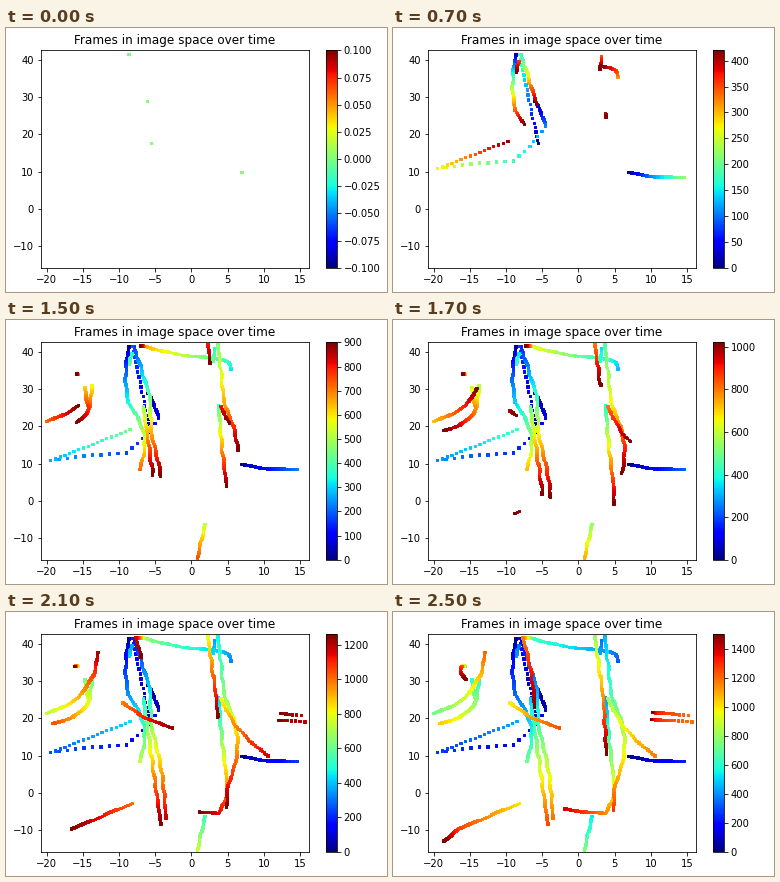
Animation, 381 px wide and 264 px high, one loop 2600 ms. Source, as a matplotlib script:

```python
import matplotlib.pyplot as plt
import numpy as np
from matplotlib.animation import FuncAnimation

WIDTH, HEIGHT, DPI = 381, 264, 72
FRAMES, INTERVAL = 26, 100
TIME_PER_FRAME = 60
SAMPLE = 10
WANDER = 0.1

rng = np.random.default_rng(4)


def leg(start, end, bend=0, ease=1):
    """Sample a bowed path between two (time, x, y) keys.

    bend is the sideways bow at the middle, positive to the left of the heading.
    ease above 1 starts slowly, below 1 ends slowly.
    """
    start, end = np.array(start, float), np.array(end, float)
    times = np.arange(start[0], end[0] + 1, SAMPLE)
    u = (times - start[0]) / (end[0] - start[0])
    u = u ** ease if ease >= 1 else 1 - (1 - u) ** (1 / ease)
    dx, dy = end[1:] - start[1:]
    length = np.hypot(dx, dy)
    waves = length / 5 * u + rng.random()
    side = np.sin(np.pi * u) * (bend + WANDER * np.sin(2 * np.pi * waves))
    x = start[1] + dx * u - dy / length * side
    y = start[2] + dy * u + dx / length * side
    return np.column_stack([times, x, y])


def route(start, *stops):
    """Chain legs; each stop is (time, x, y[, bend[, ease]])."""
    legs = []
    for stop in stops:
        legs.append(leg(start, stop[:3], *stop[3:]))
        start = stop[:3]
    return np.vstack(legs)


# Upper left
descent = route((0, -8.7, 41.5), (340, -8.8, 26.5, -0.4, 1.4), (720, -7.2, 8.6, 1.4))
excursion = route((0, -6.1, 29), (105, -4.6, 22.3, 0.2), (175, -9, 13, 0.3),
                  (265, -19.5, 10.9, -0.3), (440, -8.2, 19.5))
climb = route((0, -5.6, 17.6), (190, -8.2, 41.5, 0, 1.1))
long_fall = route((160, -8, 41.5), (420, -5.8, 28.2), (660, -5.6, 18),
                  (1180, -3.6, -6.6, 0.4))
side_fall = route((480, -6.7, 25.5), (1250, -4.3, -8.2))
short_fall = route((360, -8.3, 39.5), (420, -8.6, 36.8))
late_fall = route((1170, -7.7, 41.7), (1500, -6.1, 23, 0.3))
slope = route((980, -9.5, 24.3), (1240, -2.7, 17.5, -0.6))

# Far left
outer_rise = route((720, -20, 21.5), (900, -15.7, 25.8, -0.4), (1210, -13, 37.8, -0.7))
outer_fall = route((570, -13.8, 31), (740, -14.1, 25.5), (1040, -19.2, 18.7, 1.2))
outer_branch = route((620, -14.8, 30.4), (780, -14.3, 25))
hover = route((640, -15.7, 34.1), (1260, -16.2, 34), (1500, -15.6, 30.6, -0.4))
low_left = route((1000, -8.2, -2.7), (1260, -16.6, -9.6), (1500, -18.7, -13))

# Right half
drift = route((0, 6.9, 9.9), (225, 14.7, 8.6, -0.5, 1.2))
ceiling = route((315, 5.4, 35.5), (420, 3, 38.5, -0.8), (650, -6.5, 41.6, 0.6),
                (1150, -7.7, 41.7))
drop = route((350, 3.1, 41), (420, 2.9, 37.7))
inner_fall = route((400, 3.7, 25.7), (900, 4.8, 4, -0.1), (1140, 3.7, -5.4, 0.5),
                   (1400, -2, -4.2, 0.2))
bow = route((460, 3.6, 42), (660, 4.5, 26), (1140, 4.9, 1.5, 1.6), (1280, 4.8, -4.6))
branch = route((800, 4, 25.5), (1170, 10.5, 10, -0.9))
plumb = route((800, 2.2, 42), (1140, 3.4, 25.3), (1500, 3.8, 10.5))
bottom = route((530, 1.8, -6.3), (740, 0.8, -15.2))
lower_lane = route((1190, 15.6, 19.2), (1500, 10, 19.8, 0, 0.25))
upper_lane = route((1200, 15.1, 20.9), (1500, 10.2, 21.7, 0, 0.25))

points = np.vstack([
    descent, excursion, climb, long_fall, side_fall, short_fall, late_fall,
    slope, outer_rise, outer_fall, outer_branch, hover, low_left, drift,
    ceiling, drop, inner_fall, bow, branch, plumb, bottom, lower_lane,
    upper_lane])
points = points[np.argsort(points[:, 0], kind="stable")]

fig = plt.figure(figsize=(WIDTH / DPI, HEIGHT / DPI), dpi=DPI, facecolor="white")


def pixel_axes(left, bottom, width, height):
    return fig.add_axes([left / WIDTH, bottom / HEIGHT, width / WIDTH, height / HEIGHT])


ax = pixel_axes(35, 24.2, 267.84, 217.44)
cax = pixel_axes(319.58, 24.2, 10.95, 217.44)
ax.set(xlim=(-20.78, 16.22), ylim=(-15.85, 42.55))
ax.set_title("Frames in image space over time")
dots = ax.scatter([0], [0], c=[0], s=6, marker="s", cmap="jet", vmin=-0.1, vmax=0.1)
fig.colorbar(dots, cax=cax)


def update(frame):
    now = frame * TIME_PER_FRAME
    seen = points[points[:, 0] <= now]
    dots.set_offsets(seen[:, 1:])
    dots.set_array(seen[:, 0])
    # A single instant has no range, so the scale opens around zero.
    dots.set_clim(*((0, now) if now else (-0.1, 0.1)))
    return (dots,)


anim = FuncAnimation(fig, update, frames=FRAMES, interval=INTERVAL,
                     repeat=True, repeat_delay=0, blit=False)
plt.show()
```
